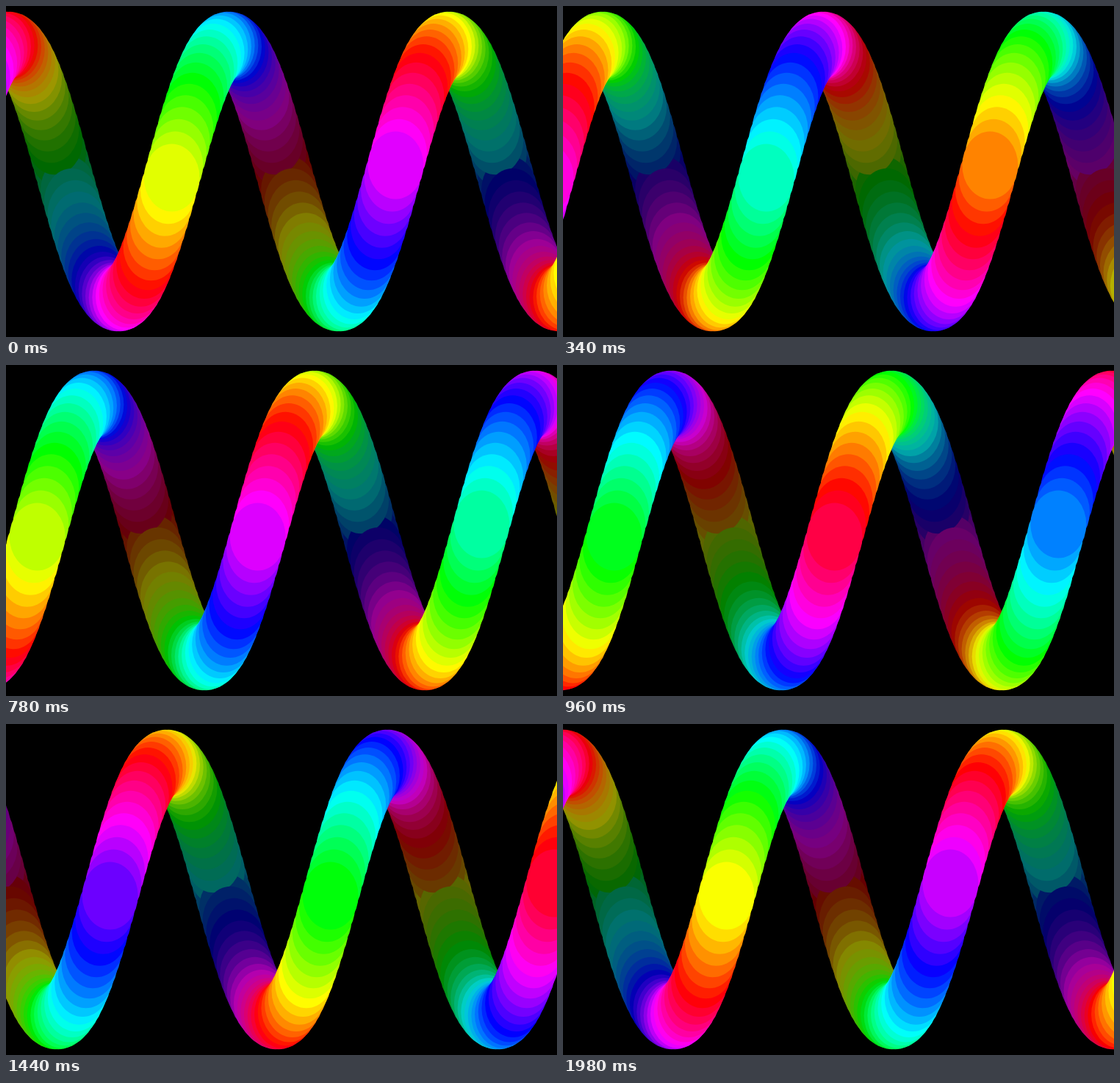
These frames come from a looping animation (750 by 450 pixels, 2000 ms). An HTML page with a canvas:

```html
<!DOCTYPE html>
<html lang="en">
<head>
<meta charset="utf-8">
<title>Rainbow helix</title>
<style>
  html, body { margin: 0; width: 100%; height: 100%; overflow: hidden; background: #000; }
  canvas { display: block; }
</style>
</head>
<body>
<canvas id="stage" width="750" height="450"></canvas>
<script>
const ctx = document.getElementById('stage').getContext('2d');
const W = 750, H = 450;
const LOOP = 2000, STEP = 20;
const WAVE = 300;          // px per turn, also the travel per loop
const PER_TURN = 64;       // discs per turn
const AMP = 171.5, RX = 38, RY = 46;
const GAP = WAVE / PER_TURN;

function makeDisc(i, crest) {
  const a = (i + 0.5) * 2 * Math.PI / PER_TURN;
  const x = crest + (i + 0.5) * GAP;
  const z = -Math.sin(a);
  return {
    x, z,
    y: H / 2 - AMP * Math.cos(a),
    depth: Math.round(z * 1e5),
    tie: z > 0 && x < 500 ? -x : x
  };
}

// Hue is fixed to the x position, brightness to the depth.
function color(d) {
  const hue = ((67 + 1.923 * (d.x - 225.7)) % 360 + 360) % 360;
  const value = Math.min(1, (240 + 140 * d.z) / 255);
  return `hsl(${hue}, 100%, ${value * 50}%)`;
}

function draw(t) {
  const crest = 3 + WAVE * t / LOOP;
  const first = Math.floor((-60 - crest) / GAP);
  const last = Math.ceil((W + 60 - crest) / GAP);
  const discs = [];
  for (let i = first; i <= last; i++) discs.push(makeDisc(i, crest));
  discs.sort((a, b) => a.depth - b.depth || a.tie - b.tie);

  ctx.fillStyle = '#000';
  ctx.fillRect(0, 0, W, H);
  for (const d of discs) {
    ctx.fillStyle = color(d);
    ctx.beginPath();
    ctx.ellipse(d.x, d.y, RX, RY, 0, 0, 2 * Math.PI);
    ctx.fill();
  }
}

const start = performance.now();
function tick() {
  const ms = Math.max(0, performance.now() - start) % LOOP;
  draw(Math.floor(ms / STEP) * STEP);
  requestAnimationFrame(tick);
}
tick();
</script>
</body>
</html>
```
